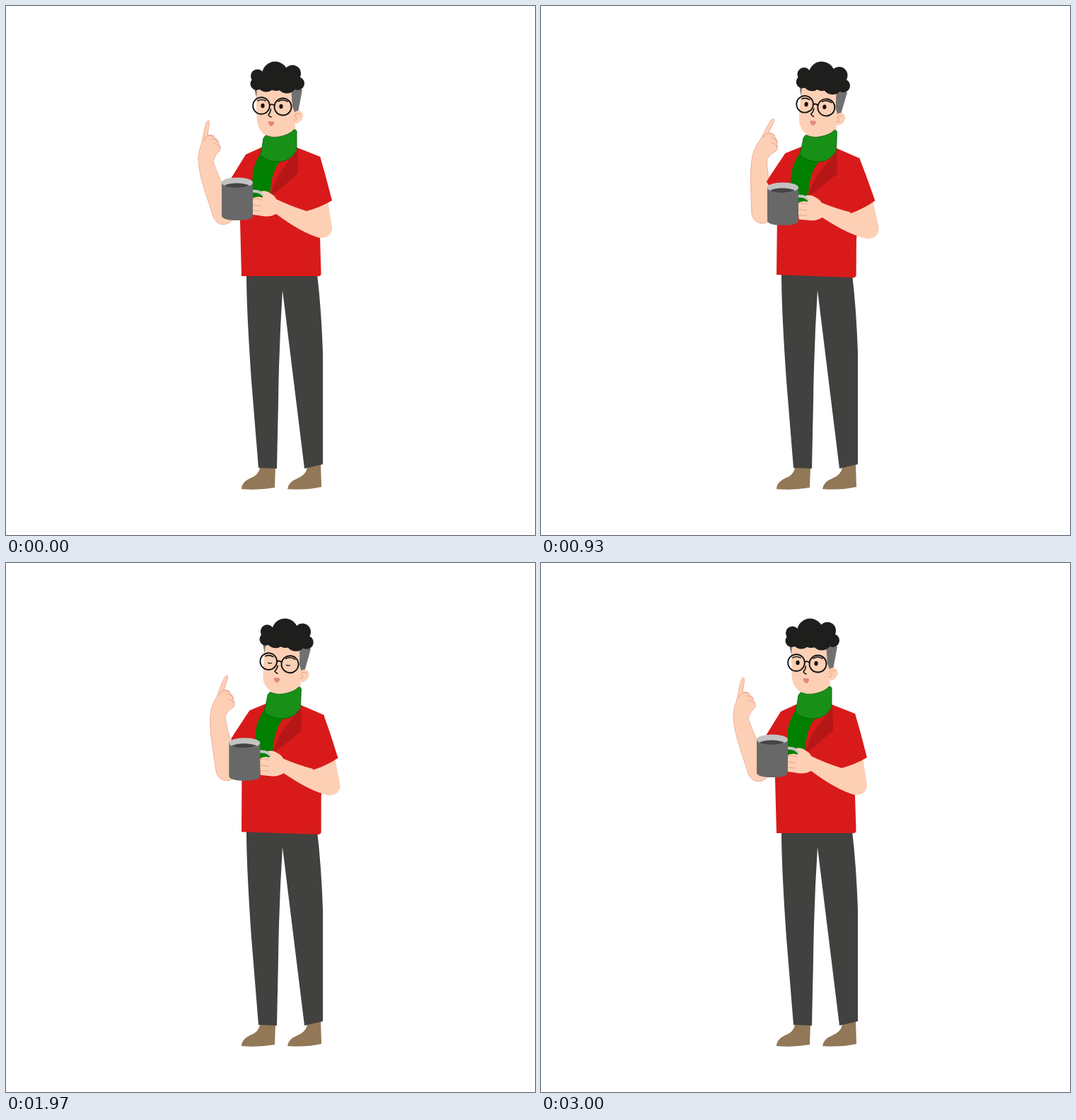
Write an HTML page that moves like this. It is 748 px wide and 748 px high and loops after 3030 ms.

```html
<!DOCTYPE html>
<html lang="en">
<head>
<meta charset="utf-8">
<title>Man with a mug</title>
<style>
  html, body { margin: 0; width: 100%; height: 100%; overflow: hidden; background: #fff; }
  svg { display: block; width: 100vw; height: 100vh; }
  .skin { fill: #fdd0b5; }
  .red { fill: #d91a1a; }
  .line { fill: none; stroke: #111; stroke-linecap: round; stroke-linejoin: round; }
  .crease { fill: none; stroke: #e9a48f; stroke-width: 1; stroke-linecap: round; }
</style>
</head>
<body>
<svg viewBox="0 0 748 748">
  <!-- legs -->
  <g fill="#927857">
    <path d="M359 650L381 652L380 681Q357 685 333 683Q333 673 347 667Q357 663 359 653Z"/>
    <path d="M426 650L445 646L446 680Q424 685 398 683Q399 673 412 668Q424 663 426 653Z"/>
  </g>
  <path fill="#41413f" d="M340 379H440Q446 430 448 490V648L422 654L391 402Q386 480 385 560L383 654L357 653L347 530Q340 430 340 379Z"/>

  <!-- raised arm -->
  <g id="raised">
    <path class="skin" stroke="#eeaa9b" stroke-width=".9" d="M293 298C284 268 271 237 272 213Q273 203 277 193L281 173Q283 163 286 162Q289 163 287 170L285 183Q293 181 295 186Q301 190 301 196Q305 199 302 205Q296 210 293 219Q294 225 305 250L322 275L330 300L320 303Q314 309 307 309Q297 308 293 298Z"/>
    <path class="crease" d="M280 191Q282 184 286 183L294 184M290 188Q297 187 300 193M293 195Q299 194 302 199"/>
  </g>

  <g id="head">
    <path fill="#707070" d="M351 117H359V132L354 129ZM402 117L419 118L413 150L407 153L402 145Z"/>
    <path class="skin" d="M355 115H403L405 142L408 150L409 174L408 190H370L368 183Q357 177 355 164Q353 140 355 115Z"/>
    <path class="skin" d="M407 151Q412 146 417 149Q422 154 418 161Q413 168 406 165Z"/>
    <path class="crease" d="M416 153Q409 150 408 156Q412 156 411 160Q409 162 407 161"/>
    <g fill="#1e1e1d">
      <circle cx="380.5" cy="97" r="18.5"/>
      <circle cx="355.5" cy="99" r="9.5"/>
      <circle cx="354.5" cy="110" r="9"/>
      <circle cx="368" cy="108" r="13.5"/>
      <circle cx="382" cy="106" r="14"/>
      <circle cx="397" cy="109" r="14.5"/>
      <circle cx="405" cy="95.5" r="12"/>
      <circle cx="412.5" cy="109.5" r="9.5"/>
    </g>
    <g class="line" stroke-width="1.9">
      <circle cx="361" cy="141" r="11.8"/>
      <circle cx="391.5" cy="142.5" r="12"/>
      <path d="M373 140Q376 138 379.5 140.5"/>
      <path stroke-width="1.6" d="M374.5 146Q374 151 371 154Q372 156 375 157"/>
      <path stroke-width="1.6" d="M356 134Q361 131 367 134M385 135Q391 131 398 135"/>
    </g>
    <g id="open" fill="#111">
      <ellipse cx="363" cy="141" rx="2.6" ry="3.2"/>
      <ellipse cx="389" cy="142" rx="2.6" ry="3.2"/>
    </g>
    <path id="shut" class="line" stroke-width="1.3" d="M360.5 143Q363 144 365.5 143M386.5 144Q389 145 391.5 144"/>
    <path id="mouth" fill="#e5877d" d="M-4.5 -2Q-2 -4 0 -2.5Q3 -4 4.5 -1.5Q3 4 0 4Q-3.5 3 -4.5 -2Z"/>
  </g>

  <g id="torso">
    <path class="red" d="M339 210L361 200H411L444 213L452 245L444 328L445.5 377Q446 382 442 382H333L331 305L326 268L314 251L318 244Z"/>
    <path fill="#007f00" d="M362 206Q352 219 349 235L346 284H374Q371 235 390 217Z"/>
    <path fill="#b51717" d="M412.5 205L413 237L374 270Q378 248 391 231Q401 217 412.5 205Z"/>
    <path fill="#189018" stroke="#075d0a" stroke-width=".8" d="M367 183Q377 187 386 185Q401 182 407 175Q410 174 411 177L411 204Q403 218 389 220Q371 221 360.5 212Q359 208 362 200L364 187Z"/>
  </g>

  <g id="handle" fill="none" stroke="#c4c4c4" stroke-width="4">
    <path d="M347 262Q359 260 366 270"/>
  </g>
  <g id="holding">
    <path class="skin" d="M348 272Q357 268 362 271L365 268L360 262Q368 260 374 265Q380 268 382 273Q400 282 425 290L434 258L453 262Q457 288 461 313Q461 328 444 328Q418 321 382 294Q373 299 363 297L349 295Z"/>
    <path class="crease" d="M349 273Q356 271 362 275M349 281L361 283M349 289L360 290"/>
  </g>
  <g id="sleeve">
    <path class="red" d="M418 216L444 213L451 237L461 275Q444 285 425 290L414 262Z"/>
  </g>

  <g id="mug">
    <path fill="#686868" d="M305 249H349V297Q347 303 327 303Q307 303 305 297Z"/>
    <ellipse cx="327" cy="249.7" rx="22" ry="7.3" fill="#c2c2c2"/>
    <path fill="#444" d="M309 254Q314 250.500 326 250.500Q338 250.500 344 254Q337 257 326 257Q315 257 309 254Z"/>
  </g>
</svg>
<script>
const LOOP = 3030, END = 3000;
const part = {};
for (const el of document.querySelectorAll("svg [id]")) part[el.id] = el;

// Progress from 0 to 1 between two times, and its smooth version.
const span = (t, from, to) => Math.min(1, Math.max(0, (t - from) / (to - from)));
const ease = u => (1 - Math.cos(Math.PI * u)) / 2;

const move = (x, y) => `translate(${x} ${y})`;
const turn = (a, x, y) => `rotate(${a} ${x} ${y})`;
const pose = (name, ...steps) => part[name].setAttribute("transform", steps.join(" "));

function draw(now) {
  const t = now % LOOP;
  const back = span(t, 930, END);
  const lean = ease(span(t, 0, 600)) - ease(span(t, 1620, END));
  const lift = ease(span(t, 0, 720)) - back ** 1.3;
  const hold = ease(span(t, 0, 580)) - back ** 1.7;
  const talk = .72 + .28 * Math.cos(6 * Math.PI * t / LOOP);
  const body = turn(2.1 * lean, 388, 382);
  const cup = move(15 * hold, 7 * hold);

  pose("torso", body);
  pose("head", body, turn(3.7 * lean, 385, 190));
  pose("raised", move(5 * lean, -lean), turn(16 * lift, 310, 295));
  pose("sleeve", body, turn(-7 * hold, 442, 213));
  pose("holding", move(17 * hold, hold), turn(-3.4 * hold, 447, 318));
  pose("mug", cup);
  pose("handle", cup);
  pose("mouth", move(375, 166), `scale(${talk})`);

  const blink = t > 1900 && t < 2040;
  part.open.style.display = blink ? "none" : "";
  part.shut.style.display = blink ? "" : "none";
  requestAnimationFrame(draw);
}
draw(performance.now());
</script>
</body>
</html>
```
